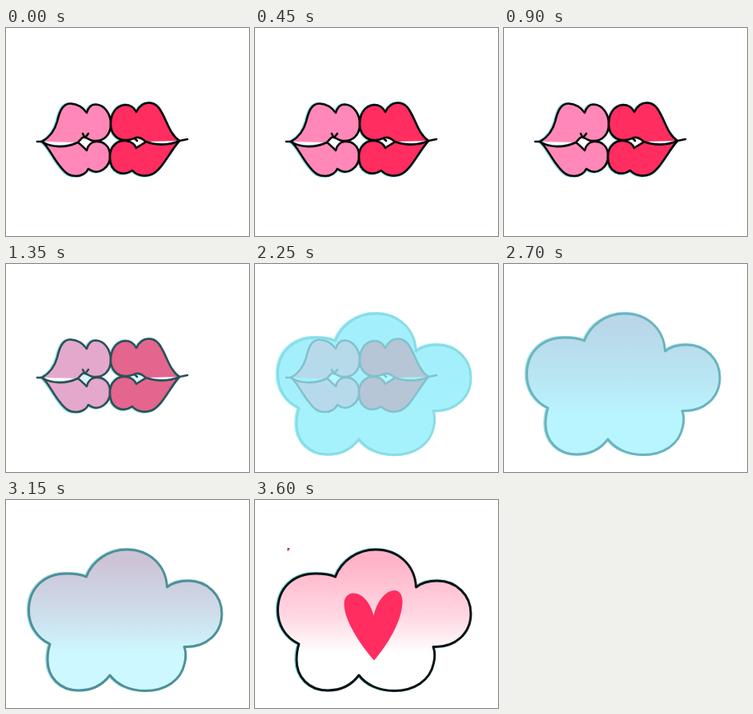
Write an HTML page that moves like this. It is 304 by 260 pixels and loops after 5.7 s.

```html
<!DOCTYPE html>
<html lang="en">
<head>
<meta charset="utf-8">
<title>Kiss and heart cloud</title>
<style>
html, body { margin: 0; width: 100%; height: 100%; overflow: hidden; background: #fff; }
svg { display: block; width: 100%; height: 100%; animation: palette 5700ms step-end infinite; }
.lips { opacity: var(--lips); stroke: var(--lip-line); stroke-width: 2.6; stroke-linejoin: round; stroke-linecap: round; fill: none; }
.left { fill: var(--left); }
.right { fill: var(--right); }
.cloud { opacity: var(--cloud); stroke-linejoin: round; }
.gap { fill: var(--gap); stroke: none; }
.edge { fill: none; stroke: var(--edge); stroke-width: 3; }
.fringe { fill: none; stroke: var(--fringe); stroke-width: 4; }
.heart { opacity: var(--heart); fill: #ff2d60; }
.speck { opacity: var(--heart); fill: #c4203f; }
.top { stop-color: var(--top); }
.middle { stop-color: var(--middle); }
.bottom { stop-color: var(--bottom); }

/* Each step is a hard cut: lips pale away, then the cloud gains its colour. */
@keyframes palette {
  0%, 100% {
    --lips: 1; --cloud: 0; --heart: 0; --fringe: #8fdde0;
    --lip-line: #050708; --left: #ff88b9; --right: #ff2d60; --gap: #fff;
  }
  23.684% {
    --lips: 1; --cloud: 0; --heart: 0; --fringe: #8fdde0;
    --lip-line: #2d5057; --left: #e4a8cd; --right: #e4658e; --gap: #d9f6fb;
  }
  31.579% {
    --lips: 1; --cloud: 0; --heart: 0; --fringe: #8fdde0;
    --lip-line: #5899a3; --left: #c7cde2; --right: #c7a0bc; --gap: #b2eff8;
  }
  39.474% {
    --lips: 1; --cloud: 1; --heart: 0; --fringe: #a3f0fc;
    --lip-line: #82c1cc; --left: #b7daeb; --right: #b6c6d7; --gap: #b4f7ff;
    --edge: #8adce4; --top: #a3effb; --middle: #a3f0fc; --bottom: #a5f1fc;
  }
  47.368% {
    --lips: 0; --cloud: 1; --heart: 0; --fringe: #9fe4e8;
    --edge: #6cb4bc; --top: #b9d7e8; --middle: #b9e6f3; --bottom: #b9f5ff;
  }
  55.263% {
    --lips: 0; --cloud: 1; --heart: 0; --fringe: #9fdfe3;
    --edge: #4f9098; --top: #cdc3d6; --middle: #cddeeb; --bottom: #cdf8ff;
  }
  63.158% {
    --lips: 0; --cloud: 1; --heart: 1; --fringe: #8fdde0;
    --edge: #0b1416; --top: #ffb2c8; --middle: #ffd6e1; --bottom: #fff;
  }
}
</style>
</head>
<body>
<svg viewBox="0 0 304 260">
  <defs>
    <linearGradient id="sky" gradientUnits="userSpaceOnUse" x1="0" y1="75" x2="0" y2="192">
      <stop class="top" offset="0"/>
      <stop class="middle" offset=".58"/>
      <stop class="bottom" offset="1"/>
    </linearGradient>
    <path id="cloud" d="M100.5 96C108 76 128 62 151 62C179 62 200 81 201.5 109C209 103 219 101 228 101C252 101 270 119 270 142C270 167 250 185 223 183.5C226 192 225 198 223.5 204C219 226 199 238.5 174 238.5C155 238.5 139 231 130 219C121 231 107 238 91 238C67 238 52 221 52 200C52 193 53 186 55 180C38 172 28.5 156 28.5 138C28.5 110 48 92 76 92C85 92 94 93 100.5 96Z"/>
    <path id="left" d="M45 142C53 148 58 161 67 172C76 184 81 185 88 185C95 185 101 181 103 176C117 186 131 173 130 159C130 147 121 141 112 142C105 143 102 148 101 153C98 150 94 146 90 143C75 150 57 150 45 142C54 137 61 128 64 117C67 104 71 94 81 94.5C90 95 96 99 101 106C103 99 107 95.5 112 95.5C124 96 131 108 131 120C131 134 122 142 110 141C106 141 102 138 98 136C94 137 93 140 90 143"/>
    <path id="right" d="M217 141C205 154 195 178 182 183C173 186.500 163 184 158 178C146 186 130 181 130 161C130 148 139 140 150 141C157 142 161 145 163 150C166 147 171 146 175 142C188 147 204 147 217 141C205 133 202 118 195 106C187 89 170 90 163 105C160 99 155 96 149 96C137 97 131 108 131 120C131 133 140 141 151 140C156 140 160 138 163 137C168 136 171 139 175 142"/>
  </defs>

  <g class="cloud">
    <use href="#cloud" class="fringe" x="-.9" y="-.2"/>
    <use href="#cloud" fill="url(#sky)"/>
    <use href="#cloud" class="edge"/>
    <path class="heart" d="M149 200.500C131 180 111.500 150 111.500 130C111.500 121 117 116.500 123 116.500C135 116.500 145 130 148.500 144.500C152 128 163 113 174.500 113C181 113 184.500 119 184.500 127C184 152 165 182 149 200.500Z"/>
    <path class="speck" d="M40.500 60H43.500L42 63.500H40.500Z"/>
  </g>

  <g class="lips">
    <use href="#left" class="fringe" x="-.8" y=".2"/>
    <use href="#right" class="fringe" x="-.4" y=".2"/>
    <path class="gap" d="M90 143L98 136L108 141L101 153ZM156 140L164 136L175 142L163 150Z"/>
    <use href="#left" class="left"/>
    <use href="#right" class="right"/>
    <path d="M39 142H45M217 141L227 139M98 136L96 132M99 137L103 132M161 138L164 141"/>
  </g>
</svg>
</body>
</html>
```
